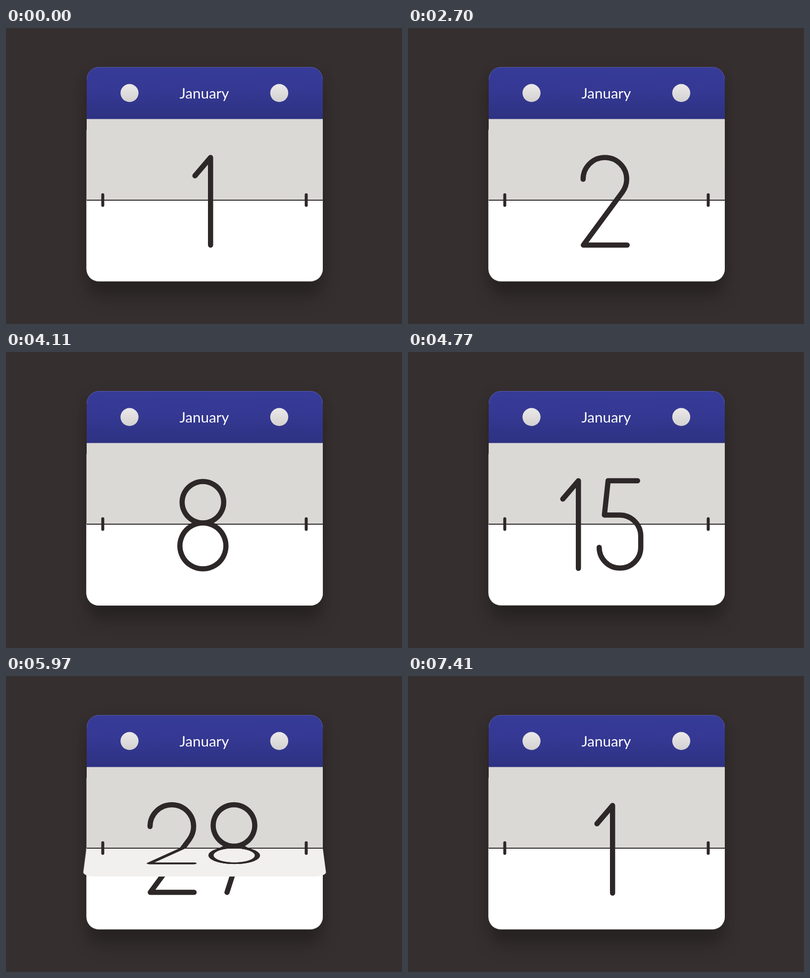
Animation of 800 by 600 pixels, one loop 7.47 s. Source, as an HTML page:

```html
<!DOCTYPE html>
<html lang="en">
<head>
<meta charset="utf-8">
<title>Flip calendar</title>
<style>
  html, body { margin: 0; width: 100%; height: 100%; overflow: hidden; background: #362f2f; }
  #stage { position: absolute; left: 0; top: 0; width: 800px; height: 600px; overflow: hidden;
    perspective: 5100px; perspective-origin: 401px 349px; }
  #stage > * { position: absolute; }
  #shadow { left: 163px; top: 79px; width: 477px; height: 435px; border-radius: 25px;
    box-shadow: 0 34px 30px -4px #282323, 0 4px 18px #302a2a; }
  #base { left: 163px; top: 170px; width: 477px; height: 179px; background: #dad9d6; }
  .half { left: 161px; width: 480px; height: 165px; overflow: hidden; }
  .half.up { top: 184px; transform-origin: 50% 100%; }
  .half.down { top: 349px; transform-origin: 50% 0; }
  .half path { fill: none; stroke: #2d2728; stroke-width: 10.5; stroke-linecap: round; stroke-linejoin: round; }
  #cover { left: 0; top: 0; }
</style>
</head>
<body>
<div id="stage">
  <div id="shadow"></div>
  <div id="base"></div>
  <svg class="half" id="top"></svg>
  <svg class="half" id="bottom"></svg>
  <svg class="half" id="flap"></svg>
  <svg id="cover" width="800" height="600">
    <defs>
      <linearGradient id="blue" x2="0" y2="1">
        <stop stop-color="#373b99"/><stop offset=".4" stop-color="#353994"/><stop offset="1" stop-color="#2e3282"/>
      </linearGradient>
      <linearGradient id="pin" x2="0" y2="1">
        <stop stop-color="#ebe9e9"/><stop offset="1" stop-color="#d3d1d0"/>
      </linearGradient>
    </defs>
    <path d="M163 184.500V104a25 25 0 0 1 25-25H615a25 25 0 0 1 25 25V184.500Z" fill="url(#blue)"/>
    <path d="M163.500 104a24.500 24.500 0 0 1 24.500-24.500H615a24.500 24.500 0 0 1 24.500 24.500" fill="none" stroke="#6568a4" stroke-opacity=".7"/>
    <circle cx="249.500" cy="131.800" r="18.200" fill="url(#pin)"/>
    <circle cx="552" cy="131.800" r="18.200" fill="url(#pin)"/>
    <text x="400.500" y="143" font-family="Lato, sans-serif" font-size="29.500" text-anchor="middle" fill="#fff">January</text>
    <path d="M163 349H640" stroke="#2d2728" stroke-width="2"/>
    <path d="M195.500 338V359.500M606.500 338V359.500" stroke="#2d2728" stroke-width="6" stroke-linecap="round"/>
  </svg>
</div>
<script>
const LOOP = 7470, START = 1950, FRAME = 30, LAST = 31;

// Strokes of each digit, from the left edge and cap line
const digits = [
  'M0 44A43.5 43.5 0 0 1 87 44V133.5A43.5 43.5 0 0 1 0 133.5Z',
  'M0 37L31.5 0V177.5',
  'M0 44A44 44 0 0 1 88 44Q88 58 79.5 70L.5 177.5H89',
  'M0 44A43.5 43.5 0 0 1 87 44C87 67 67 84.5 44 84.5H34.5H44C68 84.5 87 104 87 127V134A43.5 43.5 0 0 1 0 134',
  'M60.5-4.5L0 128.5H98M69.5 83.5V171.5',
  'M77.5 0H18L10.5 69.5H41.5A42.5 42.5 0 0 1 84 112V135A42 42 0 0 1 0 135',
  'M87.5 134A43.5 43.5 0 1 1 .5 134A43.5 43.5 0 1 1 87.5 134M6 113L60 0',
  'M0 0H87L30 177.5',
  'M44 84A42 42 0 1 1 44.1 84A46.5 46.5 0 1 1 44 84',
  'M0 44A43.5 43.5 0 1 1 87 44A43.5 43.5 0 1 1 0 44M81 65L28 177.5'
];
const widthOf = d => d === 1 ? 31.5 : d === 5 ? 84 : 87.5;

// Length of each page turn: speeding up, cruising, slowing down
const turns = [
  740, 445, 345, 215, 165, 138, 118, 108, 102, 95, 90, 88, 86, 85,
  ...Array(8).fill(90),
  88, 92, 102, 117, 142, 182, 262, 345, 590
];

const [top_, bottom, flap] = ['top', 'bottom', 'flap'].map(id => document.getElementById(id));

function numeral(n) {
  const list = [...String(n)].map(Number);
  const gap = list[0] === 1 ? 42 : 38;
  const total = list.reduce((sum, d) => sum + widthOf(d), gap * (list.length - 1));
  const two = list.length > 1;
  let x = 397.5 - total / 2 - (two && list[0] === 1 ? 6 : 0);
  return list.map(d => {
    const path = `<path transform="translate(${x} ${two ? 261 : 262.5})" d="${digits[d]}"/>`;
    x += widthOf(d) + gap;
    return path;
  }).join('');
}

// Paper runs from grey (hanging up, 0) to white (lying down, 1)
function shade(k) {
  const mix = from => Math.round(from + (255 - from) * k);
  return `rgb(${mix(218)},${mix(217)},${mix(214)})`;
}

function paint(svg, up, n, k, edge) {
  svg.setAttribute('class', 'half ' + (up ? 'up' : 'down'));
  svg.setAttribute('viewBox', `161 ${up ? 184 : 349} 480 165`);
  const line = edge ? '<rect x="162.5" y="184" width="477.5" height="330" rx="25" fill="#b9b6b5"/>' : '';
  svg.innerHTML = `${line}<rect x="162.5" y="184" width="477.5" height="${edge ? 329 : 330}" rx="25" fill="${shade(k)}"/>${numeral(n)}`;
}

function turnAt(time) {
  let i = 0;
  while (i < LAST && time >= turns[i]) time -= turns[i++];
  if (i === LAST) return { day: 1, next: 1, k: 0 };
  let u = Math.max(0, time) / turns[i];
  if (i === 0) u = u ** 1.4;
  if (i === LAST - 1) u = 1 - (1 - u) ** 1.6;
  return { day: i + 1, next: (i + 1) % LAST + 1, k: (1 - Math.cos(Math.PI * u)) / 2 };
}

function draw(ms) {
  const time = Math.floor(ms % LOOP / FRAME) * FRAME - START;
  const { day, next, k } = turnAt(time);
  const up = k < 0.5;
  paint(top_, true, k ? next : day, 0);
  paint(bottom, false, day, 1, true);
  paint(flap, up, up ? day : next, k);
  flap.style.display = k ? '' : 'none';
  flap.style.transform = `rotateX(${up ? -180 * k : 180 * (1 - k)}deg)`;
}

const begin = performance.now();
function tick() {
  draw(performance.now() - begin);
  requestAnimationFrame(tick);
}
tick();
</script>
</body>
</html>
```
